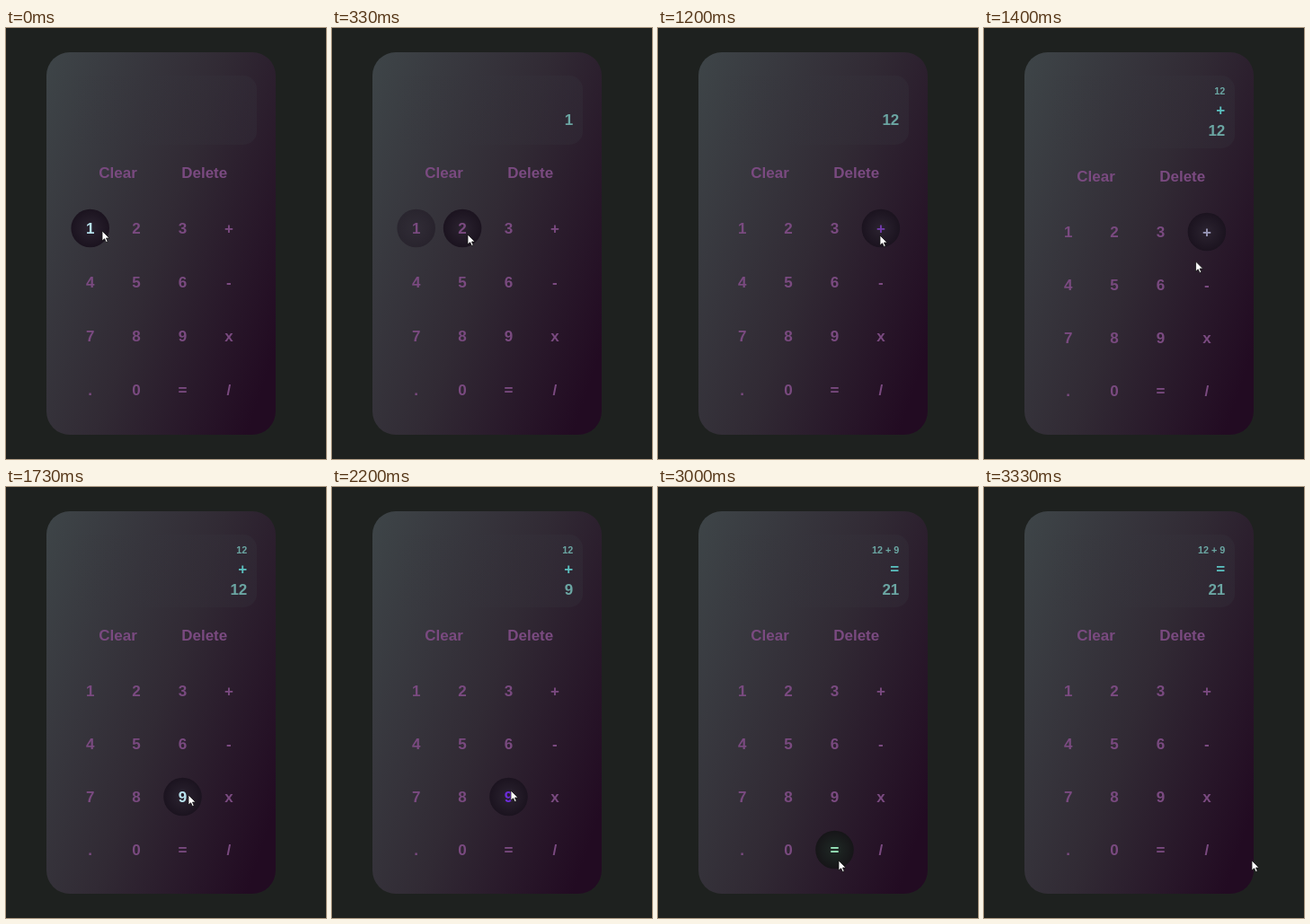
Write an HTML page that moves like this. It is 356x480 px and loops after 3390 ms.

```html
<!DOCTYPE html>
<html lang="en">
<head>
<meta charset="utf-8">
<title>Calculator</title>
<style>
  html, body { margin: 0; width: 100%; height: 100%; overflow: hidden; background: #1e211f; }
  svg { display: block; width: 100%; height: 100%; }
  text { font: bold 17px "Liberation Sans", Arial, sans-serif; }
  #keys text { text-anchor: middle; }
  #screen text { text-anchor: end; fill: #6ba6a3; }
  #screen #sum { font-size: 10.8px; }
  #screen #op { fill: #5abebe; }
</style>
</head>
<body>
<svg viewBox="0 0 356 480">
  <defs>
    <linearGradient id="body" gradientUnits="userSpaceOnUse" x1="-7" y1="178" x2="352" y2="302">
      <stop offset="0" stop-color="#3e4548"/>
      <stop offset=".5" stop-color="#312a34"/>
      <stop offset=".92" stop-color="#220b22"/>
    </linearGradient>
    <linearGradient id="glass">
      <stop offset="0" stop-color="#36353c" stop-opacity="0"/>
      <stop offset="1" stop-color="#36353e" stop-opacity=".3"/>
    </linearGradient>
    <radialGradient id="dark">
      <stop offset="0" stop-color="#2b2330"/>
      <stop offset="1" stop-color="#1b131f"/>
    </radialGradient>
    <radialGradient id="green">
      <stop offset="0" stop-color="#1f2925"/>
      <stop offset="1" stop-color="#161518"/>
    </radialGradient>
  </defs>
  <rect width="356" height="480" fill="#1e211f"/>
  <rect x="45" y="27" width="255" height="426" rx="26" fill="url(#body)"/>
  <rect id="panel" x="67" y="53" width="212" rx="15" fill="url(#glass)"/>
  <g id="screen">
    <text id="sum" x="268.3" y="74"></text>
    <text id="op" x="268.3" y="97"></text>
    <text id="num" x="268.3"></text>
  </g>
  <g id="keys"></g>
  <path id="pointer" d="M0 0V11L2.6 8.7L4.4 12.6L6.2 11.8L4.5 8H8Z" fill="#fff" stroke="#151515" stroke-width=".8"/>
</svg>
<script>
const LOOP = 3390, TICK = 200 / 3, LAST = 50;
const RADIUS = 21.3, TRAIL = 4;
const NS = "http://www.w3.org/2000/svg";
const $ = id => document.getElementById(id);

const PLAIN = [122, 74, 128], CYAN = [184, 228, 240];
const MINT = [156, 234, 190], VIOLET = [108, 44, 218];

// Pointer moves, timed in ticks
const HOME = [107, 226];
const MOVES = [
  { from: 2, to: 5, end: [151, 230] },
  { from: 7, to: 11, end: [200, 354] },
  { from: 11, to: 16, end: [247, 231] },
  { from: 20, to: 23, end: [203, 343] },
  { from: 26, to: 32, end: [199, 338] },
  { from: 35, to: 39, end: [201, 416] },
  { from: 45, to: 50, end: [298, 416], dip: 8 }
];
const CLICKS = [
  { key: "1", at: 2 }, { key: "2", at: 7 }, { key: "+", at: 19 },
  { key: "9", at: 33 }, { key: "=", at: 44 }
];

const clamp = v => Math.max(0, Math.min(1, v));
const ease = p => p * p * (3 - 2 * p);
const mix = (a, b, p) => a.map((v, i) => v + (b[i] - v) * p);

function add(name, attrs) {
  const el = document.createElementNS(NS, name);
  for (const k in attrs) el.setAttribute(k, attrs[k]);
  return $("keys").appendChild(el);
}

const keys = [];
function addKey(label, x, row) {
  const fill = `url(#${label === "=" ? "green" : "dark"})`;
  const disc = add("circle", { cx: x, r: row ? RADIUS : 0, fill });
  const text = add("text", { x });
  text.textContent = label;
  keys.push({ label, x, row, disc, text });
}
addKey("Clear", 124.5, 0);
addKey("Delete", 220.7, 0);
["123+", "456-", "789x", ".0=/"].forEach((line, r) =>
  [...line].forEach((c, i) => addKey(c, 93.7 + i * 51.4, r + 1)));

function baseline(row, tall) {
  const top = tall ? 171 : 167, gap = tall ? 59 : 60;
  return row ? top + 62 + (row - 1) * gap : top;
}

function pointerAt(k) {
  let pos = HOME;
  for (const { from, to, end, dip = 0 } of MOVES) {
    const p = ease(clamp((k - from) / (to - from)));
    const [x, y] = mix(pos, end, p);
    pos = [x, y + dip * Math.sin(Math.PI * p)];
  }
  return pos;
}

// Replays the clicks made so far
function calc(k) {
  const s = { sum: "", op: "", num: "" };
  let fresh = false;
  for (const { key } of CLICKS.filter(c => c.at <= k)) {
    if (key === "+") {
      Object.assign(s, { sum: s.num, op: key });
      fresh = true;
    } else if (key === "=") {
      const total = Number(s.sum) + Number(s.num);
      Object.assign(s, { sum: `${s.sum} + ${s.num}`, op: key, num: String(total) });
    } else {
      s.num = fresh ? key : s.num + key;
      fresh = false;
    }
  }
  return s;
}

function isOver(key, k) {
  const [x, y] = pointerAt(k);
  const cy = baseline(key.row, calc(k).op) - 6;
  return key.row > 0 && Math.hypot(x - key.x, y - cy) < RADIUS;
}

// Share of the recent ticks that the pointer spent on a key
function heat(key, k) {
  let hits = 0;
  for (let i = 0; i < TRAIL; i++) hits += isOver(key, k - i);
  return hits / TRAIL;
}

function keyColor(label, warm, k) {
  const click = CLICKS.find(c => c.key === label && (k === c.at || k === c.at - 1));
  if (click) return mix(PLAIN, VIOLET, (k - click.at + 2) / 2);
  return mix(PLAIN, label === "=" ? MINT : CYAN, clamp(2 * warm - 1));
}

function draw(k) {
  const { sum, op, num } = calc(k);
  $("sum").textContent = sum;
  $("op").textContent = op;
  $("num").textContent = num;
  $("num").setAttribute("y", op ? 120 : 108);
  $("panel").setAttribute("height", op ? 81 : 77);

  for (const key of keys) {
    const y = baseline(key.row, op), warm = heat(key, k);
    key.text.setAttribute("y", y);
    key.text.style.fill = `rgb(${keyColor(key.label, warm, k).map(Math.round)})`;
    key.disc.setAttribute("cy", y - 6);
    key.disc.setAttribute("opacity", clamp(2 * warm));
  }
  $("pointer").setAttribute("transform", `translate(${pointerAt(k)})`);
}

// The picture advances 15 times per second
const start = performance.now();
let shown = -1;
function run() {
  const t = (performance.now() - start) % LOOP;
  const k = Math.min(LAST, Math.floor((t + 4) / TICK));
  if (k !== shown) draw(shown = k);
  requestAnimationFrame(run);
}
run();
</script>
</body>
</html>
```
